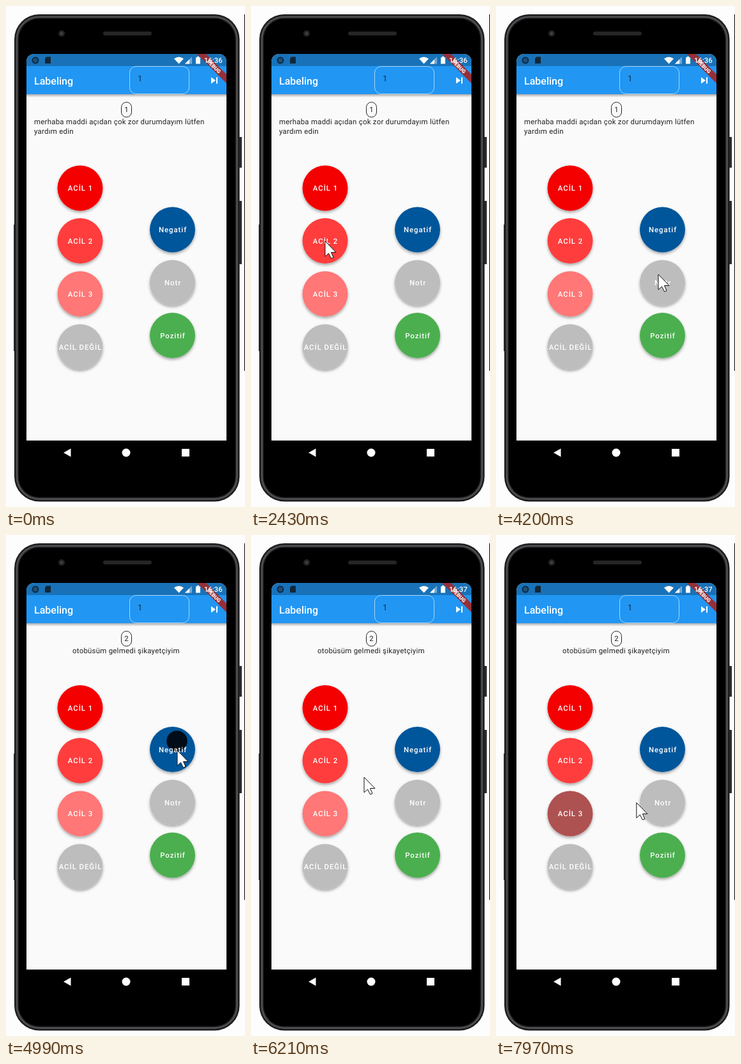
An HTML page for the animation above (8000 ms loop, 374 by 784 pixels).

```html
<!DOCTYPE html>
<html lang="tr">
<head>
<meta charset="utf-8">
<title>Labeling</title>
<style>
  html, body { margin: 0; width: 100%; height: 100%; overflow: hidden; background: #fdfdfd; }
  svg { display: block; width: 374px; height: 784px; font-family: Roboto, sans-serif; text-rendering: geometricPrecision; }
  .body { font-size: 11.43px; letter-spacing: .25px; fill: #222; }
  .label { font-size: 11.4px; font-weight: 500; letter-spacing: .95px; fill: #fff; text-anchor: middle; }
</style>
</head>
<body>
<svg viewBox="0 0 374 784">
  <defs>
    <clipPath id="screen"><path d="M32 680V87a12 12 0 0 1 12-12H333a12 12 0 0 1 12 12V680z"/></clipPath>
    <clipPath id="disc"><circle r="35.5"/></clipPath>
    <filter id="shadow" x="-30%" y="-30%" width="160%" height="160%">
      <feDropShadow dx="0" dy="2.5" stdDeviation="2.2" flood-color="#000" flood-opacity=".35"/>
    </filter>
    <linearGradient id="fade" x2="0" y2="1">
      <stop stop-opacity=".32"/><stop offset="1" stop-opacity="0"/>
    </linearGradient>
  </defs>

  <!-- phone -->
  <path d="M373.5 13V571" stroke="#000"/>
  <path d="M365 205h4v48h-4zM365 305h4v99h-4z" fill="#2c2c2e"/>
  <path d="M12.500 342V540" stroke="#3a3a3c"/>
  <rect x="13" y="13" width="352.500" height="762.500" rx="39" fill="#1c1c1e"/>
  <rect x="17" y="17" width="344.500" height="754.500" rx="35" fill="none" stroke="#4c4c4e" stroke-width="3"/>
  <rect x="20" y="20" width="338.500" height="748.500" rx="32" fill="#000"/>
  <circle cx="87" cy="43" r="5" fill="#242426"/>
  <circle cx="87" cy="43" r="2" fill="#47474a"/>
  <rect x="152" y="40" width="76" height="6" rx="3" fill="#262626"/>
  <g fill="#fff">
    <path d="M90 699l11.500-6.500v13z"/>
    <circle cx="188" cy="699" r="6.500"/>
    <rect x="275" y="693" width="12" height="12"/>
  </g>

  <g clip-path="url(#screen)">
    <path d="M32 75h313v605H32z" fill="#fafafa"/>
    <path d="M32 138h313v5H32z" fill="url(#fade)"/>
    <path d="M32 75h313v19H32z" fill="#1972b8"/>
    <path d="M32 94h313v44H32z" fill="#2196f3"/>

    <!-- status bar -->
    <circle cx="46" cy="85" r="4.500" fill="#1d4f7a" stroke="#0d2c48" stroke-width="2"/>
    <path d="M63.500 79.500h6.500v10.500h-9v-8z" fill="#12283a"/>
    <path d="M299 75h14l32 32v14z" fill="#963038"/>
    <g fill="#fff">
      <path d="M263 82.500q7.500-5.500 15 0l-7.500 8z"/>
      <path d="M280 90.500l11-11v11z" opacity=".4"/>
      <path d="M280 90.500l7-7v7z"/>
      <path d="M297 80.500h2v-1.500h3v1.500h2v10h-7z"/>
    </g>
    <text transform="translate(325.400 94.600) rotate(45)" y="3" text-anchor="middle" font-size="8.300" font-weight="900" fill="#fff">DEBUG</text>
    <text id="clock" x="310" y="89" font-size="11.300" font-weight="500" fill="#fff"></text>

    <!-- app bar -->
    <text x="44" y="122.500" font-size="16" font-weight="500" fill="#fff">Labeling</text>
    <rect x="193.500" y="94.500" width="93" height="43" rx="10" fill="none" stroke="#a9d8fb"/>
    <text x="206" y="118" font-size="13" fill="#0c3050">1</text>
    <path d="M321 111.500l7 5-7 5zM329 111.500h2v10h-2z" fill="#fff"/>

    <!-- message -->
    <rect x="180.500" y="150.500" width="16" height="23.500" rx="8" fill="none" stroke="#222"/>
    <text id="number" class="body" x="188.500" y="166" text-anchor="middle"></text>
    <g id="first" class="body">
      <text x="44" y="185">merhaba maddi açıdan çok zor durumdayım lütfen</text>
      <text x="44" y="199.500">yardım edin</text>
    </g>
    <text id="second" class="body" x="104" y="185">otobüsüm gelmedi şikayetçiyim</text>
    <g id="buttons"></g>
  </g>

  <path id="cursor" d="M0 0V24L5.500 19L9.500 27L13 25.500L9.500 17.500H17z" fill="#fff" stroke="#111"/>
</svg>
<script>
const DURATION = 8000, PAGE_TURN = 4965, MINUTE_TURN = 5300, CURSOR_IN = 800;
const $ = id => document.getElementById(id);

const buttons = [
  ['ACİL 1', 116, 285, '#f40000'],
  ['ACİL 2', 116, 367.5, '#ff3d3d'],
  ['ACİL 3', 116, 450.5, '#ff7777'],
  ['ACİL DEĞİL', 116, 533.5, '#bdbdbd'],
  ['Negatif', 260.5, 350, '#01579b'],
  ['Notr', 260.5, 433, '#bdbdbd'],
  ['Pozitif', 260.5, 515.5, '#4caf50'],
];
$('buttons').innerHTML = buttons.map(([label, x, y, color]) => `
  <g transform="translate(${x} ${y})">
    <circle r="35.5" fill="${color}" filter="url(#shadow)"/>
    <g clip-path="url(#disc)"><circle class="ripple"/></g>
    <text class="label" x=".5" y="4">${label}</text>
  </g>`).join('');
const ripples = document.querySelectorAll('.ripple');

// button, offset from its centre, press and release times
const taps = [
  [0, -1, -6, 3370, 3450],
  [4, 7, -13, 4880, PAGE_TURN],
  [2, 2, 1, 7695, 7780],
];

// time, x, y
const path = [
  [800, 374, 330], [1380, 146, 275], [1590, 140, 282], [1970, 116, 368], [2430, 116, 368],
  [2560, 112, 372], [2900, 112, 372], [3250, 115, 279], [3520, 115, 279], [3850, 250, 345],
  [4200, 254, 420], [4420, 258, 468], [4570, 260, 462], [4840, 268, 337], [5410, 268, 337],
  [5850, 185, 445], [6210, 177, 379], [6600, 232, 415], [7050, 125, 475],
  [7450, 118, 437], [7800, 118, 437], [8010, 230, 417],
];

function cursorAt(t) {
  const i = Math.max(1, path.findIndex(p => p[0] >= t));
  const [t0, x0, y0] = path[i - 1], [t1, x1, y1] = path[i];
  const k = (t - t0) / (t1 - t0), e = k * k * (3 - 2 * k);
  return [x0 + (x1 - x0) * e, y0 + (y1 - y0) * e];
}

function drawRipple([index, x, y, press, release], t) {
  const after = Math.max(0, t - release);
  const radius = (Math.min(t, release) - press) * .1 + after * .3;
  const opacity = t < press ? 0 : Math.max(0, .93 * (1 - after / 290));
  const attributes = { cx: x, cy: y, r: Math.max(0, radius), opacity };
  for (const name in attributes) ripples[index].setAttribute(name, attributes[name]);
}

function draw(now) {
  const t = now % DURATION, turned = t >= PAGE_TURN;
  $('clock').textContent = t < MINUTE_TURN ? '16:36' : '16:37';
  $('number').textContent = turned ? 2 : 1;
  $('first').style.display = turned ? 'none' : '';
  $('second').style.display = turned ? '' : 'none';
  $('buttons').setAttribute('transform', `translate(0 ${turned ? -14.5 : 0})`);
  taps.forEach(tap => drawRipple(tap, t));
  $('cursor').style.display = t < CURSOR_IN ? 'none' : '';
  if (t >= CURSOR_IN) $('cursor').setAttribute('transform', `translate(${cursorAt(t)})`);
  requestAnimationFrame(() => draw(performance.now() - start));
}
const start = performance.now();
draw(0);
</script>
</body>
</html>
```
